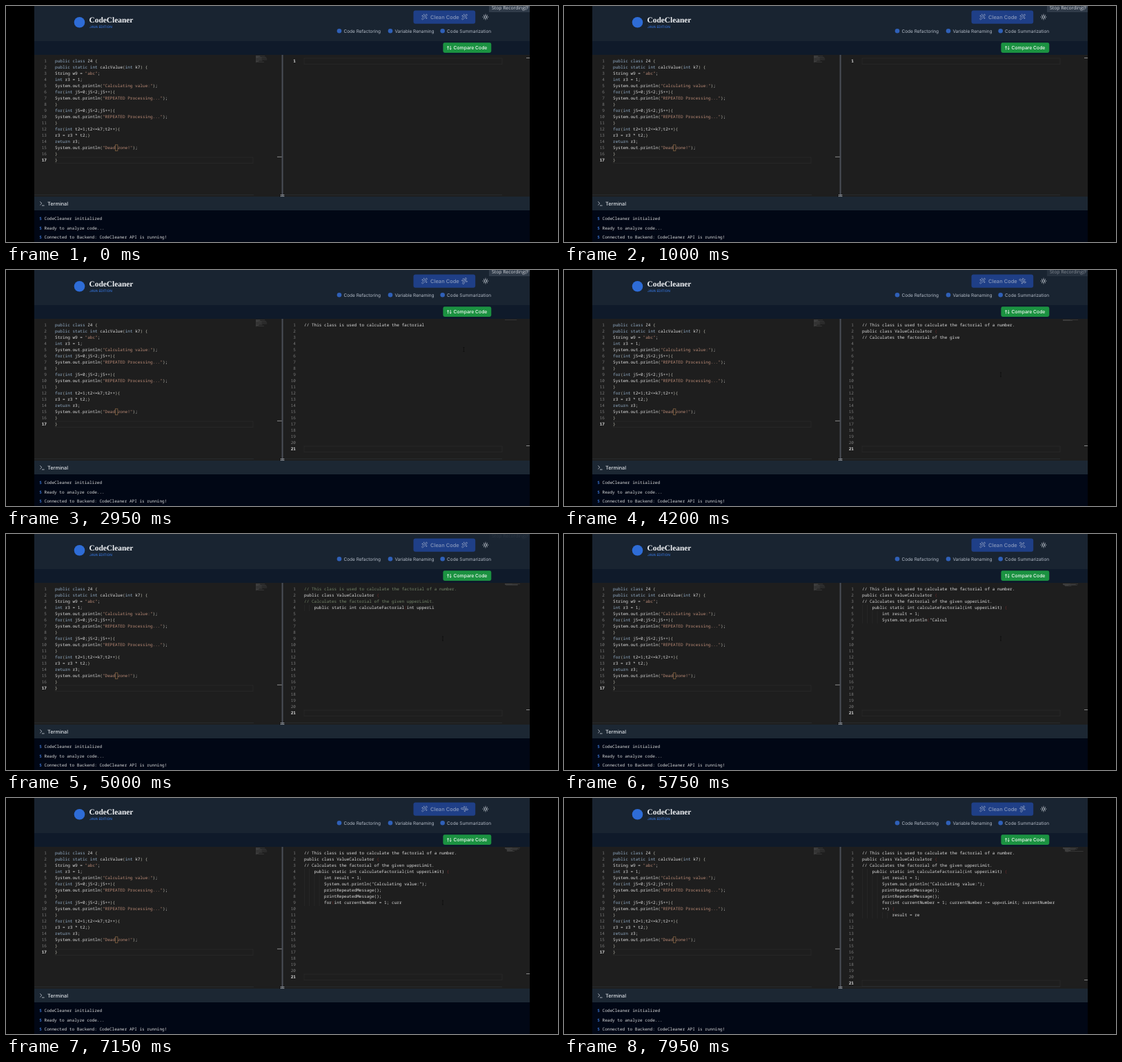
An HTML page that plays this animation: 800 px wide and 343 px high, repeating every 8000 ms.

```html
<!DOCTYPE html>
<html lang="en">
<head>
<meta charset="utf-8">
<title>Code cleaner</title>
<style>
  html, body { margin: 0; width: 100%; height: 100%; overflow: hidden; background: #000; }
  svg { display: block; width: 800px; height: 343px; }
  text { text-rendering: geometricPrecision; white-space: pre; font-family: Inter, sans-serif; }
  .code text { font: 500 6.05px "Noto Sans Mono", monospace; fill: #dcdcdc; }
  .code .num { text-anchor: end; fill: #7b7b7b; }
  .code .now { fill: #d8d8d8; font-weight: 600; }
  .label { font-size: 6.5px; fill: #b4bcc8; }
  .icon { fill: none; stroke-width: .8; stroke-linecap: round; stroke-linejoin: round; }
  .rowbox { fill: none; stroke: #292929; stroke-width: .8; }
</style>
</head>
<body>
<svg viewBox="0 0 800 343">
  <defs>
    <clipPath id="page"><rect x="41" width="718" height="343"/></clipPath>
    <g id="wand">
      <rect x="-1" y="-4.9" width="2" height="9.8" rx=".6" transform="rotate(45)"/>
      <path d="M.8-2l1.2 1.2M-2.8-2.4v1.6M-3.6-1.6h1.6M2.8.8v1.6M2 1.6h1.6M-.8-4v.8M-1.2-3.6h.8"/>
    </g>
  </defs>
  <g clip-path="url(#page)">
    <rect x="41" width="718" height="51" fill="#192431"/>
    <rect x="41" y="51" width="718" height="20" fill="#0f1a2a"/>
    <rect x="41" y="71" width="718" height="206" fill="#1e1e1e"/>
    <rect x="41" y="277" width="718" height="20" fill="#1c2733"/>
    <rect x="41" y="297" width="718" height="46" fill="#010715"/>

    <circle cx="106.5" cy="23.8" r="7.8" fill="#2e6cd6"/>
    <text x="120.5" y="24.3" style="font:bold 11.4px 'Liberation Serif',serif" fill="#f1f3f6">CodeCleaner</text>
    <text x="121" y="32" font-size="4.8" font-weight="500" fill="#3574dc">JAVA EDITION</text>

    <rect x="590.5" y="6.4" width="89.7" height="19.3" rx="3" fill="#1f3f87"/>
    <text x="615" y="18.9" font-size="7.5" font-weight="500" fill="#8797ba">Clean Code</text>
    <g class="icon" stroke="#8797ba">
      <use href="#wand" transform="translate(606.5 16)"/>
      <use href="#wand" id="spinner"/>
    </g>
    <g class="icon" stroke="#d5dbe3">
      <circle cx="695" cy="16" r="1.7"/>
      <g id="rays"></g>
    </g>
    <g id="labels"></g>

    <rect x="633.4" y="53.3" width="69.9" height="14.7" rx="2.4" fill="#1b9241"/>
    <path class="icon" stroke="#e8f5ec" d="M640.6 63.2v-4.6M639.4 59.8l1.2-1.2l1.2 1.2M644.2 58.4v4.6M643 62l1.2 1.2l1.2-1.2"/>
    <text x="648.5" y="63.2" font-size="6.8" font-weight="500" fill="#f2f8f4">Compare Code</text>

    <g id="tip">
      <rect x="700" y="-1" width="62" height="10" fill="#303b49"/>
      <text x="704" y="5.3" style="font:6.8px 'Open Sans',sans-serif" fill="#d3d7dc">Stop Recording(F10)</text>
    </g>

    <rect class="rowbox" x="71" y="220" width="287" height="8.6"/>
    <rect x="393" y="218.8" width="7" height="1" fill="#8b8b8b"/>
    <g class="code" id="left"></g>
    <rect x="158.4" y="201.8" width="3.5" height="8.8" fill="none" stroke="#8f6a45" stroke-width=".7"/>
    <g id="leftMap" fill="#777" opacity=".6"></g>

    <path d="M41 274.5H359M401 274.5H719" stroke="#272a2d" stroke-width="1"/>
    <rect x="399.6" y="71" width="2" height="206" fill="#4a4f57"/>
    <g id="grip" fill="#c3c8cf"></g>

    <rect class="rowbox" id="rightBox" x="432" width="287" height="8.6"/>
    <rect id="rightMark" x="754" width="5" height="1" fill="#8b8b8b"/>
    <path id="guides" stroke="#2d2d2d" stroke-width=".7"/>
    <g class="code" id="right"></g>
    <g id="rightMap" fill="#777" opacity=".6"></g>
    <path id="pointer" d="M-1-3h2M0-3v6M-1 3h2" stroke="#080808" stroke-width=".7"/>

    <path class="icon" stroke="#cfd5dd" d="M49.6 284.6l2.2 2.2l-2.2 2.2M52.4 290h2.8"/>
    <text x="60" y="289.7" font-size="7.3" font-weight="500" fill="#dde1e6">Terminal</text>
    <g class="code" id="terminal"></g>
  </g>
</svg>
<script>
const LOOP = 8000, ROW = 9, CHAR = 3.63, TOP = 82.2;
const $ = id => document.getElementById(id);
const esc = s => s.replace(/&/g, '&amp;').replace(/</g, '&lt;');
const text = (x, y, body, cls = '') => `<text x="${x}" y="${y}" class="${cls}">${body}</text>`;
const tint = (s, color) => `<tspan fill="${color}">${esc(s)}</tspan>`;
const clamp = v => Math.min(1, Math.max(0, v));

const before = `public class Z4 {
public static int calcValue(int k7) {
String w9 = "abc";
int r3 = 1;
System.out.println("Calculating value:");
for(int j5=0;j5<2;j5++){
System.out.println("REPEATED Processing...");
}
for(int j5=0;j5<2;j5++){
System.out.println("REPEATED Processing...");
}
for(int t2=1;t2<=k7;t2++){
r3 = r3 * t2;}
return r3;
System.out.println("Dead zone!");
}
}`.split('\n');

const after = `// This class is used to calculate the factorial of a number.
public class ValueCalculator {
// Calculates the factorial of the given upperLimit.
    public static int calculateFactorial(int upperLimit) {
        int result = 1;
        System.out.println("Calculating value:");
        printRepeatedMessage();
        printRepeatedMessage();
        for(int currentNumber = 1; currentNumber <= upperLimit; currentNumber++) {
            result = result * currentNumber;`;

// [time, characters typed]
const typing = [[2250, 0], [2950, 48], [4200, 132], [5000, 198], [6450, 324], [7950, 449], [8000, 453]];
const WRAP = 77, LINES = 21;

const tokens = [
  [/^"/, '#b98a76'],
  [/^(public|class|static|int|for|return)$/, '#93aec8'],
  [/^[{}()]$/, '#b9b8ac'],
];

function highlight(line) {
  return line.split(/("[^"]*"|\b[a-z]+\b|[{}()])/).map(part => {
    const token = tokens.find(([pattern]) => pattern.test(part));
    return token ? tint(part, token[1]) : esc(part);
  }).join('');
}

function miniMap(rows, x, y) {
  return rows.map((row, i) => {
    const indent = row.search(/\S/);
    return indent < 0 ? '' : `<rect x="${x + indent * .36}" y="${y + i * .64}" width="${(row.length - indent) * .36}" height=".45"/>`;
  }).join('');
}

function buildStatic() {
  $('left').innerHTML = before.map((line, i) => {
    const y = TOP + i * ROW;
    return text(59, y, i + 1, i === 16 ? 'num now' : 'num') + text(71, y, highlight(line));
  }).join('');
  $('leftMap').innerHTML = miniMap(before, 362, 72);
  $('terminal').innerHTML = ['CodeCleaner initialized', 'Ready to analyze code...', 'Connected to Backend: CodeCleaner API is running!']
    .map((line, i) => text(48.3, 311.2 + i * 13.3, tint('$', '#4584ee')) + text(55.6, 311.2 + i * 13.3, line)).join('');
  $('labels').innerHTML = [[483, 'Code Refactoring'], [557, 'Variable Renaming'], [632.7, 'Code Summarization']]
    .map(([x, name]) => `<circle cx="${x}" cy="36.3" r="3.3" fill="#2f60b8"/>` + text(x + 6.4, 38.6, name, 'label')).join('');
  $('rays').innerHTML = Array.from({ length: 8 }, (_, i) =>
    `<path d="M0-3v-.9" transform="translate(695 16) rotate(${i * 45})"/>`).join('');
  $('grip').innerHTML = Array.from({ length: 6 }, (_, i) =>
    `<rect x="${398 + i % 3 * 2}" y="${274 + (i > 2) * 2}" width="1.1" height="1.1"/>`).join('');
}

function typedAt(t) {
  const i = typing.findIndex(([time]) => time > t);
  if (i < 1) return 0;
  const [[t0, n0], [t1, n1]] = [typing[i - 1], typing[i]];
  return Math.floor(n0 + (n1 - n0) * (t - t0) / (t1 - t0) + .01);
}

function unmatchedBrackets(source) {
  const open = [];
  [...source].forEach((c, i) => {
    if ('({'.includes(c)) open.push(i);
    else if (')}'.includes(c)) open.pop();
  });
  return new Set(open);
}

let drawn = '';
function drawRight(count, started, colored) {
  const key = [count, started, colored].join();
  if (key === drawn) return;
  drawn = key;
  const source = after.slice(0, count), loose = unmatchedBrackets(source);
  const lines = source.split('\n'), total = started ? LINES : 1;
  let html = '', guides = '', offset = 0, row = 0;
  const put = (s, col, start, comment) => {
    const body = [...s].map((c, i) => loose.has(start + i) ? tint(c, '#682a2a') : esc(c)).join('');
    html += text(432 + col * CHAR, TOP + row * ROW, comment ? tint(s, '#74866a') : body);
  };
  for (let n = 0; n < total; n++) {
    const line = lines[n] || '', indent = line.match(/^ */)[0].length;
    const first = row;
    html += text(420, TOP + row * ROW, n + 1, n === total - 1 ? 'num now' : 'num');
    put(line.slice(indent, WRAP), indent, offset + indent, colored && line.startsWith('//'));
    if (line.length > WRAP) {
      row++;
      put(line.slice(WRAP), indent, offset + WRAP);
    }
    for (let col = 0; col < indent; col += 2)
      guides += `M${432.4 + col * CHAR} ${76 + first * ROW}V${85 + row * ROW}`;
    offset += line.length + 1;
    row++;
  }
  const last = 76 + (row - 1) * ROW;
  $('right').innerHTML = html;
  $('guides').setAttribute('d', guides);
  $('rightMap').innerHTML = miniMap(lines, 723, 72);
  $('rightBox').setAttribute('y', last);
  $('rightMark').setAttribute('y', last - 1);
}

function render(t) {
  drawRight(typedAt(t), t >= typing[0][0], t >= 4900 && t < 5100);
  $('spinner').setAttribute('transform', `translate(664.5 16) rotate(${t % 1000 * .36})`);
  $('tip').setAttribute('opacity', 1 - clamp((t - 3500) / 1650));
  const k = clamp((t - 3100) / 800), ease = k * k * (3 - 2 * k);
  $('pointer').setAttribute('transform', `translate(${663.5 - 30.5 * ease} ${115.5 + 36.5 * ease})`);
  $('pointer').setAttribute('opacity', t < 2500 ? 0 : .8);
}

buildStatic();
const start = performance.now();
function frame() {
  render((performance.now() - start) % LOOP);
  requestAnimationFrame(frame);
}
frame();
</script>
</body>
</html>
```
